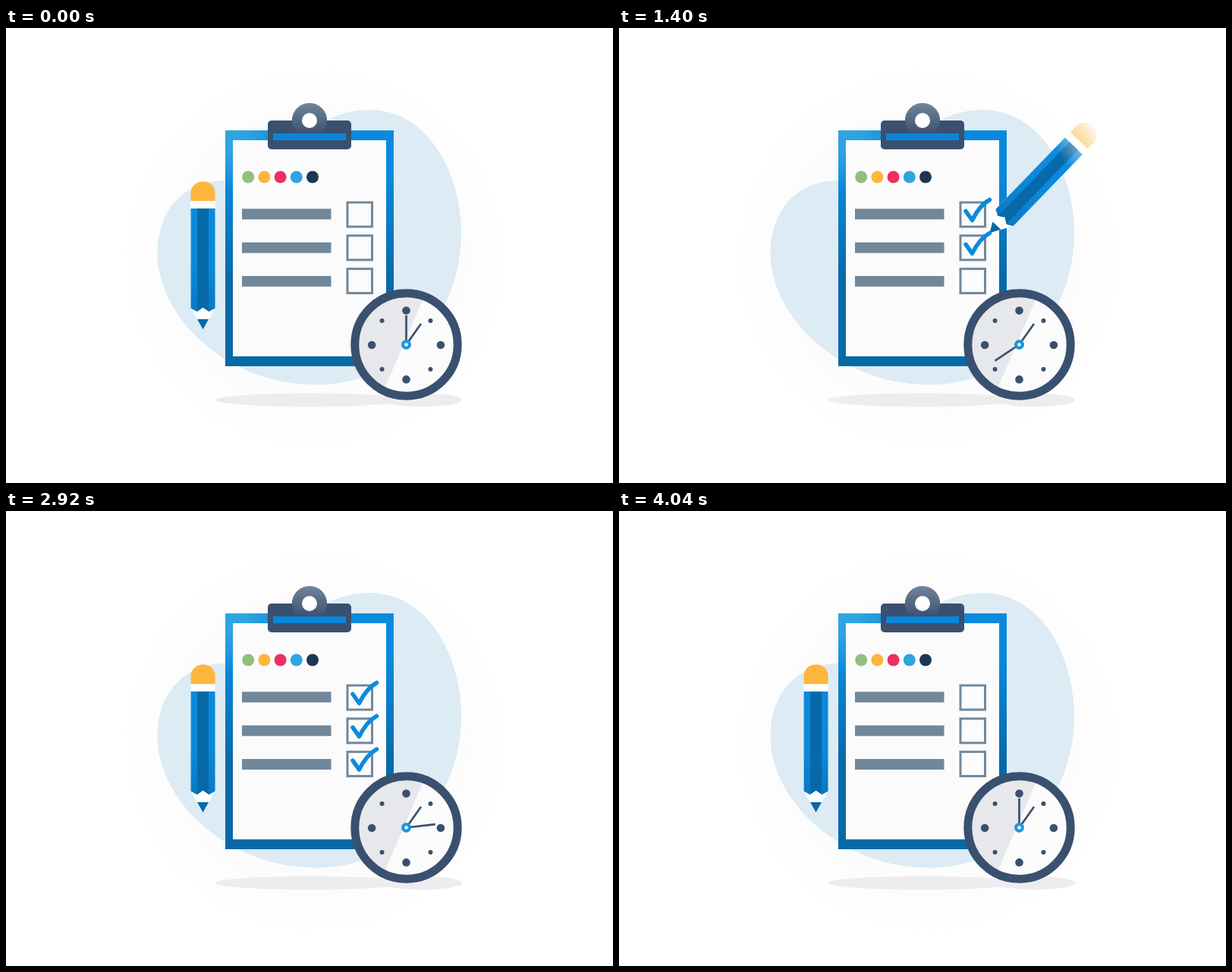
Write an HTML page that moves like this. It is 800 px wide and 600 px high and loops after 5 s.

```html
<!DOCTYPE html>
<html lang="en">
<head>
<meta charset="utf-8">
<title>Checklist</title>
<style>
html, body { margin: 0; width: 100%; height: 100%; overflow: hidden; background: #fff; }
svg { display: block; width: 800px; height: 600px; }
</style>
</head>
<body>
<svg viewBox="0 0 800 600">
  <defs>
    <radialGradient id="glow" gradientUnits="userSpaceOnUse" cx="408" cy="305" r="255">
      <stop offset=".75" stop-color="#fcfcfc"/><stop offset="1" stop-color="#fff"/>
    </radialGradient>
    <linearGradient id="frame" gradientUnits="userSpaceOnUse" x1="0" y1="195" x2="0" y2="330">
      <stop stop-color="#0b8add"/><stop offset="1" stop-color="#0769a8"/>
    </linearGradient>
    <radialGradient id="shine" gradientUnits="userSpaceOnUse" cx="294" cy="140" r="75">
      <stop offset=".3" stop-color="#2fa4e0"/><stop offset="1" stop-color="#2fa4e0" stop-opacity="0"/>
    </radialGradient>
    <linearGradient id="metal" gradientUnits="userSpaceOnUse" x1="0" y1="99" x2="0" y2="140">
      <stop stop-color="#71869a"/><stop offset="1" stop-color="#3a506f"/>
    </linearGradient>
    <linearGradient id="body" x2="0" y2="1">
      <stop offset=".55" stop-color="#0b8add"/><stop offset="1" stop-color="#0a78c2"/>
    </linearGradient>
    <radialGradient id="fade" gradientUnits="userSpaceOnUse" cx="400" cy="300" r="290">
      <stop offset=".77" stop-color="#fff"/><stop offset="1" stop-color="#000"/>
    </radialGradient>
    <mask id="edge" maskUnits="userSpaceOnUse" x="0" y="0" width="800" height="600">
      <rect width="800" height="600" fill="url(#fade)"/>
    </mask>
    <clipPath id="face"><circle cx="527.5" cy="417.5" r="63"/></clipPath>
  </defs>

  <rect width="800" height="600" fill="url(#glow)"/>
  <path fill="#dcebf4" d="M480 108C555 108 600 190 600 270C600 380 520 470.500 408 470.500C290 470.500 199.500 380 199.500 297C199.500 240 235 201 290 201C350 201 390 108 480 108"/>
  <g fill="#ededf0"><ellipse cx="400" cy="490.500" rx="124" ry="9"/><ellipse cx="548" cy="490.500" rx="53" ry="9"/></g>

  <path id="board" fill="url(#frame)" d="M289 135H511V446H289z"/>
  <path fill="url(#shine)" d="M289 135H511V446H289z"/>
  <path fill="#fbfbfb" d="M299 148H501V433H299z"/>
  <circle cx="400" cy="122" r="23" fill="url(#metal)"/>
  <rect x="345" y="122" width="110" height="38" rx="5" fill="#3a506f"/>
  <circle cx="400" cy="122" r="23" fill="url(#metal)"/>
  <circle cx="400" cy="122" r="10" fill="#fff"/>
  <path fill="#0b86d8" d="M352 139H448V148H352z"/>
  <g id="dots"></g>
  <g id="rows"></g>

  <g mask="url(#edge)">
    <g id="pencil">
      <path fill="#fff" d="M-16 -170H16V-28L0 0L-16 -28z"/>
      <path fill="#fdb53c" d="M-16 -169.500V-180A15 15 0 0 1 -1 -195H1A15 15 0 0 1 16 -180V-169.500z"/>
      <path fill="url(#body)" d="M-16 -159.500H16V-28L8 -23.500L0 -29L-8 -23.500L-16 -28z"/>
      <path fill="#0769a8" d="M-7.500 -159.500H7.500V-24L0 -29L-7.500 -24zM-7.500 -13.500H7.500L0 0z"/>
    </g>
  </g>
  <g id="ticks" fill="none" stroke="#0b8add" stroke-width="5.500" stroke-linecap="round" stroke-linejoin="round"></g>

  <circle cx="527.5" cy="417.5" r="67.500" fill="#fbfbfb"/>
  <path clip-path="url(#face)" fill="#e6e8eb" d="M552 352L496 482H440V340z"/>
  <circle cx="527.5" cy="417.5" r="67.700" fill="none" stroke="#3a506f" stroke-width="11"/>
  <g id="marks" fill="#3a506f"></g>
  <g stroke="#3a506f" stroke-width="2.700">
    <path d="M527.5 417.500L547 390"/>
    <path id="minute" d="M527.5 417.500V379"/>
  </g>
  <circle cx="527.5" cy="417.5" r="6.500" fill="#1f97dc"/>
  <circle cx="527.5" cy="417.5" r="2.200" fill="#fff"/>
</svg>
<script>
const $ = id => document.getElementById(id);
const LOOP = 5000, ROW = 43.8, TILT = 44;
const REST = { x: 259.6, y: 397.5 };
const DRAW = 160, MOVE = 280;
const starts = [560, 1220, 1880];

const circle = (x, y, r, fill = '') => `<circle cx="${x}" cy="${y}" r="${r}" ${fill && `fill="${fill}"`}/>`;
$('dots').innerHTML = ['#92bf7f', '#fdb53c', '#ee2f62', '#2fa4e0', '#1d3654']
  .map((c, i) => circle(319.2 + 21.2 * i, 196.5, 8, c)).join('');
$('rows').innerHTML = starts.map((_, i) =>
  `<rect x="311" y="${238.4 + 44.3 * i}" width="117.500" height="14" fill="#71889b"/>
   <rect x="450" y="${230 + ROW * i}" width="32.500" height="32" fill="none" stroke="#71889b" stroke-width="3"/>`).join('');
$('marks').innerHTML = [0, 1, 2, 3].map(i => {
  const a = i * Math.PI / 2, b = a + Math.PI / 4;
  return circle(527.5 + 45.4 * Math.cos(a), 418 + 45.4 * Math.sin(a), 5.3) +
         circle(527.5 + 45.2 * Math.cos(b), 418 + 45.2 * Math.sin(b), 3);
}).join('');
$('ticks').innerHTML = starts.map((_, i) =>
  `<path transform="translate(0 ${ROW * i})" d="M457 241.500L465.500 253.500Q475 234 488.500 226.500"/>`).join('');

const ticks = [...$('ticks').children];
const len = ticks[0].getTotalLength();

const clamp = x => Math.min(1, Math.max(0, x));
const ease = x => x < .5 ? 2 * x * x : 1 - 2 * (1 - x) ** 2;
const span = (t, from, dur) => ease(clamp((t - from) / dur));
const mix = (a, b, k) => a + (b - a) * k;

// cubic-bezier(2/3, 0, 2/3, 1), solved by bisection
function swing(x) {
  let lo = 0, hi = 1, s;
  for (let i = 0; i < 24; i++) {
    s = (lo + hi) / 2;
    const at = 2 * s * (1 - s) ** 2 + 2 * s * s * (1 - s) + s ** 3;
    if (at < x) lo = s; else hi = s;
  }
  return s * s * (3 - 2 * s);
}

// Point of the tick in a row, k = 0 at its start and 1 at its end
function tickPoint(row, k) {
  const p = ticks[0].getPointAtLength(len * k);
  return { x: p.x, y: p.y + ROW * row };
}

function pencilAt(t) {
  let p = REST, tilt = 0;
  const go = (to, k) => { p = { x: mix(p.x, to.x, k), y: mix(p.y, to.y, k) }; };
  starts.forEach((s, i) => {
    const dur = i ? MOVE : s;
    if (t < s - dur) return;
    const k = span(t, s - dur, dur);
    if (!i) tilt = TILT * k;
    go(tickPoint(i, 0), k);
    if (t >= s) p = tickPoint(i, span(t, s, DRAW));
  });
  const back = span(t, 2260, 540);
  go(REST, back);
  return { ...p, tilt: tilt * (1 - back) };
}

function draw(now) {
  const t = now % LOOP;
  const p = pencilAt(t);
  $('pencil').setAttribute('transform', `translate(${p.x} ${p.y}) rotate(${p.tilt})`);
  ticks.forEach((el, i) => {
    const k = span(t, starts[i], DRAW);
    el.style.display = k > 0 ? '' : 'none';
    el.setAttribute('stroke-dasharray', k < 1 ? `${len * k} 200` : 'none');
  });
  $('ticks').setAttribute('opacity', 1 - span(t, 3000, 280));
  const turn = t < 4000 ? swing(t % 2000 / 2000) * 360 : 0;
  $('minute').setAttribute('transform', `rotate(${turn} 527.5 417.5)`);
}

let begin;
function tick(now) {
  begin ??= now;
  draw(now - begin);
  requestAnimationFrame(tick);
}
draw(0);
requestAnimationFrame(tick);
</script>
</body>
</html>
```
